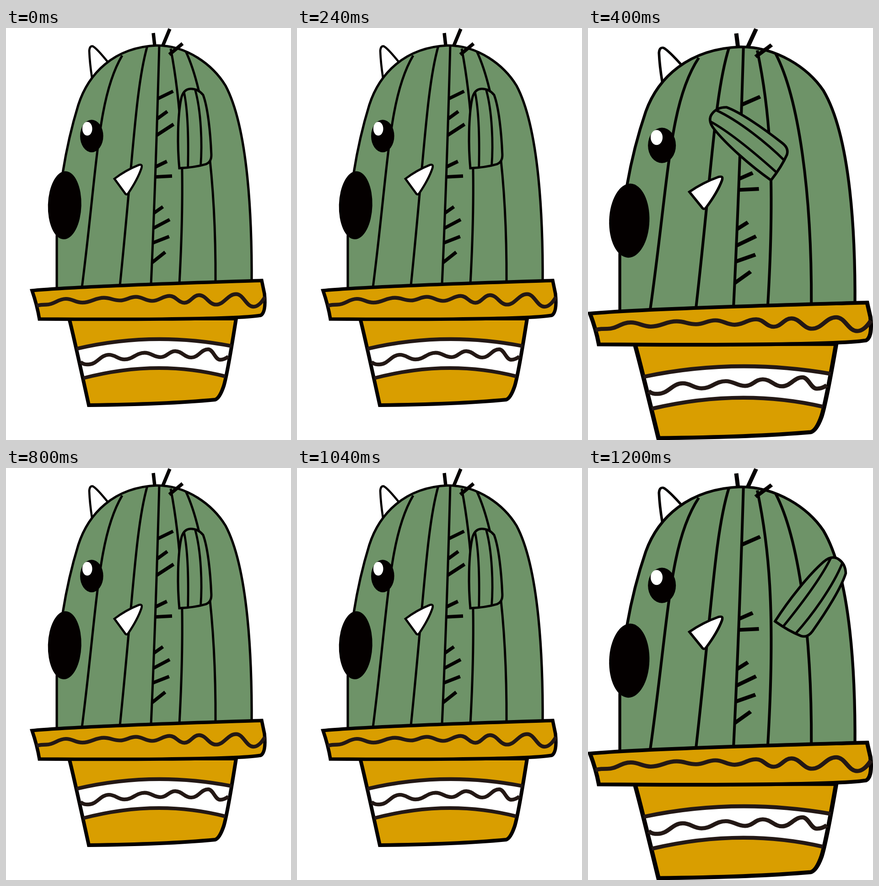
An HTML page with a canvas for the animation above (1600 ms loop, 623x899 px).

```html
<!DOCTYPE html>
<html lang="en">
<head>
<meta charset="utf-8">
<title>Waving cactus</title>
<style>
  html, body { margin: 0; width: 100%; height: 100%; overflow: hidden; background: #fff; }
  canvas { display: block; }
</style>
</head>
<body>
<canvas id="stage" width="623" height="899"></canvas>
<script>
const ctx = document.getElementById('stage').getContext('2d');
const GREEN = '#6e9368', GOLD = '#d99e00', BLACK = '#040000', BROWN = '#231815';
const STEP = 400;

function paint(path, fill, line, width) {
  const p = new Path2D(path);
  if (fill) { ctx.fillStyle = fill; ctx.fill(p); }
  if (line) { ctx.strokeStyle = line; ctx.lineWidth = width; ctx.stroke(p); }
}

function oval(x, y, rx, ry, color, tilt = 0) {
  ctx.beginPath();
  ctx.ellipse(x, y, rx, ry, tilt, 0, Math.PI * 2);
  ctx.fillStyle = color;
  ctx.fill();
}

const bar = (x, y, dx, dy) => paint(`M${x} ${y}l${dx} ${dy}`, null, BLACK, 7.5);

// A spike grows from the middle rib, which leans slightly
const spike = (y, dx, dy) => bar(338 - 0.037 * y, y, dx, dy);

// Wavy line turning at each x, alternating between a trough rule and a crest rule
function wave(start, turns, trough, crest, end) {
  let [x, y] = start;
  let d = `M${x} ${y}`;
  turns.forEach((nx, i) => {
    const ny = i % 2 ? crest(nx) : trough(nx);
    const k = (nx - x) * 0.42;
    d += `C${x + k} ${i ? y : ny} ${nx - k} ${ny} ${nx} ${ny}`;
    [x, y] = [nx, ny];
  });
  return d + `Q${(x + end[0]) / 2} ${y} ${end[0]} ${end[1]}`;
}

const body = 'M111 572V455C113 370 128 265 158 168C180 100 235 42 330 38' +
  'C395 38 452 80 480 126C530 220 538 420 537 562';
const ribs = [
  'M254 60C200 150 200 300 166 566',
  'M309 39C283 130 278 280 249 562',
  'M335 38C332 150 325 380 317 560',
  'M360 45C380 150 394 280 379 558',
  'M393 51C435 140 459 330 458 556'
];
const topHorn = 'M188 109Q183 76 182 50Q183 38 190 40Q199 45 224 76';
const sideHorn = 'M237 329Q262 310 290 299Q299 296 296 306Q288 330 267 361Q263 366 259 359Z';

const pot = 'M138 634Q144 655 181 823Q350 821 457 811Q467 808 476 781Q484 755 503 634Z';
const rim = 'M57 573C160 563 440 555 559 551L565 580Q569 620 557 627C500 637 200 636 73 635Q68 605 57 573Z';
const bandTop = 'M154 700Q320 661 493 694';
const bandBottom = 'L479 760Q330 722 169 764';
const rimWave = wave([67, 606],
  [88, 131, 167, 214, 249, 284, 319, 358, 390, 422, 459, 503, 541],
  x => 593 + 0.057 * Math.abs(x - 275), x => 591 - 0.028 * (x - 131), [566, 587]);
const bandWave = wave([163, 729],
  [180, 225, 259, 303, 338, 370, 405, 442, 468],
  x => 718 + 0.0005 * (x - 360) ** 2, x => 713 - 0.055 * (x - 225), [486, 717]);

// Drawn pointing up from the middle of its base
const arm = 'M-37 5C-40 -50 -36 -120 -26 -162Q-20 -186 -2 -186Q16 -186 28 -170' +
  'C38 -140 42 -80 42 -25Q42 -7 28 -2Q0 5 -37 5Z';
const grooves = 'M-18 -178C-10 -130 -12 -60 -16 3M9 -184C22 -130 21 -50 15 1';

const rest = { x: 412, y: 300, turn: -0.041, size: 0.9 };
const poses = [
  rest,
  { x: 419, y: 300, turn: -0.905, size: 1, swell: true },
  rest,
  { x: 442, y: 352, turn: 0.619, size: 1, swell: true }
];

function drawArm({ x, y, turn, size }) {
  ctx.setTransform(size, 0, 0, size, x, y);
  ctx.rotate(turn);
  paint(arm, GREEN, BLACK, 5.6);
  paint(grooves, null, BLACK, 5.3);
}

function drawCactus(resting) {
  paint(topHorn, '#fff', BLACK, 4.7);
  paint(body, GREEN, BLACK, 5.2);
  ribs.forEach(r => paint(r, null, BLACK, 5));

  bar(322, 11, 3, 27);
  bar(358, 2, -15, 36);
  bar(386, 34, -29, 24);
  spike(154, 33, -16);
  if (resting) {
    spike(198, 22, -16);
    spike(234, 37, -24);
  }
  spike(303, 25, -12);
  spike(325, 37, -2);
  spike(404, 20, -14);
  spike(437, 36, -19);
  spike(469, 36, -14);
  spike(512, 29, -23);

  oval(128.2, 386.7, 36.5, 74.3, BLACK, 0.03);
  oval(187.3, 235.7, 25.3, 35.5, BLACK);
  oval(177.7, 219.8, 10.8, 15, '#fff');
  paint(sideHorn, '#fff', BLACK, 4.7);
}

function drawPot() {
  paint(pot, GOLD);
  paint(bandTop + bandBottom + 'Z', '#fff');
  paint(pot, null, BLACK, 8);
  paint(bandTop + bandBottom.replace('L', 'M'), null, BROWN, 8);
  paint(bandWave, null, BROWN, 8.2);
  paint(rim, GOLD, BLACK, 7.5);
  paint(rimWave, null, BROWN, 8.2);
}

function draw(time) {
  const pose = poses[Math.floor(time / STEP) % poses.length];
  ctx.setTransform(1, 0, 0, 1, 0, 0);
  ctx.fillStyle = '#fff';
  ctx.fillRect(0, 0, 623, 899);
  // The whole plant swells whenever the arm swings out
  if (pose.swell) ctx.setTransform(1.2066, 0, 0, 1.0876, -64.4, -0.2);
  drawCactus(!pose.swell);
  drawPot();
  drawArm(pose);
}

const start = performance.now();
function tick() {
  draw(performance.now() - start);
  requestAnimationFrame(tick);
}
tick();
</script>
</body>
</html>
```
